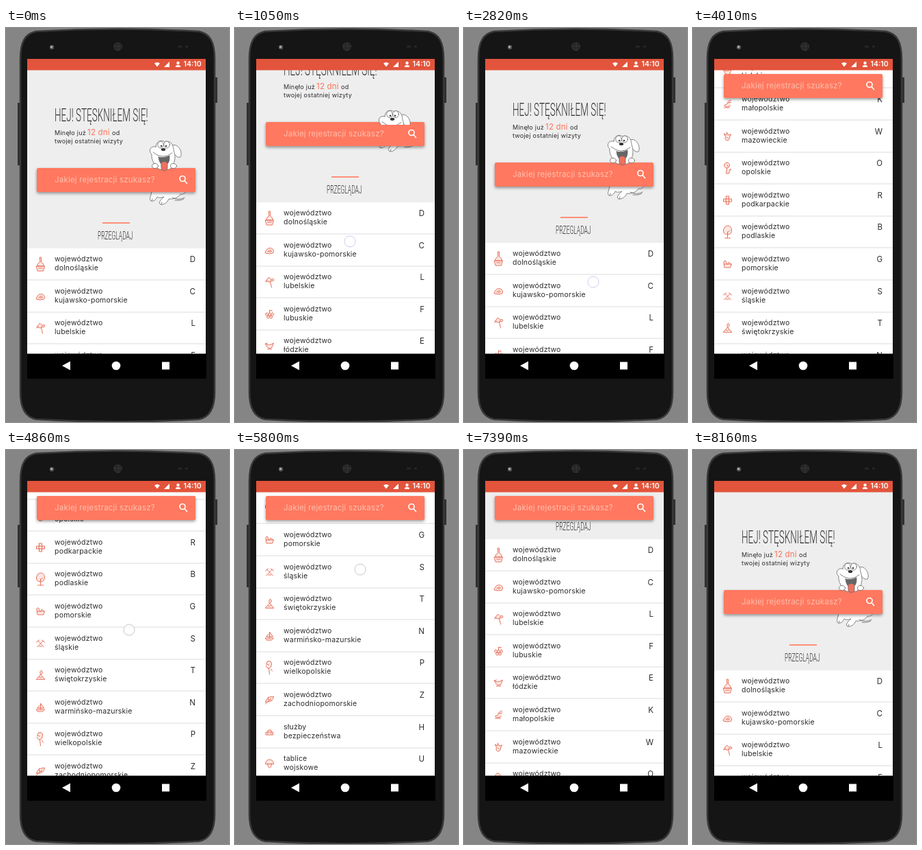
Write an HTML page that moves like this. It is 326 px wide and 574 px high and loops after 8380 ms.

```html
<!DOCTYPE html>
<html lang="pl">
<head>
<meta charset="utf-8">
<style>
  html, body { margin: 0; width: 100%; height: 100%; overflow: hidden; background: #858585; }
  svg { display: block; width: 326px; height: 574px; }
  text { font: 400 10.5px Inter, sans-serif; letter-spacing: .2px; fill: #2c2c2c; }
  .small { font-size: 9px; letter-spacing: .25px; }
  .days { font-size: 11.5px; fill: #ff7258; }
  .code { font-size: 11.5px; text-anchor: end; letter-spacing: 0; }
  .hint { font-size: 11.4px; letter-spacing: .25px; fill: #ffbfae; }
  .clock { font-weight: 600; fill: #fff; letter-spacing: 0; }
  .thin { font: 300 25.5px Roboto, sans-serif; letter-spacing: 0; fill: #333; }
  .icon { fill: #e8705b2b; stroke: #e8705b; stroke-width: 1; stroke-linejoin: round; stroke-linecap: round; }
  .dog { fill: #fff; stroke: #666; stroke-width: .8; stroke-linecap: round; }
  .slab { filter: drop-shadow(0 2px 2px #0006); }
</style>
</head>
<body>
<svg viewBox="0 0 326 574">
  <defs>
    <clipPath id="view"><path d="M31 61H292V475H31z"/></clipPath>
    <clipPath id="above"><path d="M200-60H270V4H200z"/></clipPath>
    <clipPath id="below"><path d="M200 34H270V70H200z"/></clipPath>
    <pattern id="mesh" width="2.4" height="2.4" patternUnits="userSpaceOnUse"><circle cx="1" cy="1" r=".8" fill="#555"/></pattern>
  </defs>

  <path d="M17 109h4v91h-4zM305 72h4v37h-4z" fill="#303030"/>
  <path d="M21 45C21 20 28 8 44 5Q163-2 282 5C298 8 305 20 305 45V531C305 554 298 567 282 570Q163 577 44 570C28 567 21 554 21 531z" fill="#151515" stroke="#383838" stroke-width="2.500"/>
  <circle cx="67" cy="28" r="3.2" fill="#555"/><circle cx="66.5" cy="27.5" r="1.5" fill="#bbb"/>
  <circle cx="163.5" cy="27" r="6.5" fill="url(#mesh)"/>
  <path d="M251 27h6M262 27h4" stroke="#262626" stroke-width="3"/>

  <g clip-path="url(#view)">
    <path d="M31 61H292V475H31z" fill="#fff"/>
    <g id="page">
      <path d="M31-100H292V321H31z" fill="#eee"/>
      <text class="thin" transform="translate(71 136) scale(.53 1)">HEJ! STĘSKNIŁEM SIĘ!</text>
      <text class="small" x="71" y="156">Minęło już</text>
      <text class="days" x="119" y="156">12 dni</text>
      <text class="small" x="155" y="156">od</text>
      <text class="small" x="71" y="167.5">twojej ostatniej wizyty</text>
      <path d="M141 283h40v2h-40z" fill="#ff9079"/>
      <text class="thin" style="font-size:16px" transform="translate(134 308) scale(.53 1)">PRZEGLĄDAJ</text>
      <g id="rows"></g>
    </g>
    <g id="bar">
      <g clip-path="url(#below)"><g id="legs" class="dog">
        <path d="M213 30C214 38 209 43 211 47C214 50 219 47 221 42C224 44 228 43 231 42C226 46 222 51 226 53C231 54 236 50 238 45C246 46 253 42 255 38C259 39 264 36 263 31z"/>
        <path d="M214 45l-1 3M228 50l-1 3M243 43q10 5 18 0M247 47q8 1 13-2" fill="none"/>
      </g></g>
      <rect class="slab" x="45" width="232" height="35" rx="2" fill="#ff785f"/>
      <text class="hint" x="71" y="20.5">Jakiej rejestracji szukasz?</text>
      <g fill="none" stroke="#fff" stroke-width="1.7" stroke-linecap="round"><circle cx="258" cy="15.5" r="4"/><path d="M261 18.500l3.500 4"/></g>
      <g clip-path="url(#above)"><g id="head" class="dog">
        <path d="M243-33C252-37 259-22 255-16C250-14 245-21 243-26z"/>
        <path d="M219-31C210-33 208-24 213-20C212-11 218-4 224 2H239C247-5 249-16 245-26C245-36 238-41 232-38C226-42 219-38 219-31z"/>
        <ellipse cx="226" cy="-34" rx="4.300" ry="5"/><ellipse cx="235" cy="-34" rx="4.300" ry="5"/>
        <g fill="#333" stroke="none"><circle cx="227" cy="-32" r="1.200"/><circle cx="234" cy="-32" r="1.200"/><ellipse cx="230" cy="-27" rx="3.200" ry="2"/></g>
        <path d="M215-23Q229-11 243-22" fill="none"/>
        <path d="M223-16Q231-14 239-18Q240-5 231-4Q224-5 223-16z" fill="#666"/>
        <path d="M227-8Q231-11 236-8V0C235 5 228 5 227 0z" fill="#f0705e"/>
        <ellipse cx="218" cy="-3" rx="4.500" ry="3.500"/><ellipse cx="245" cy="-3" rx="4.500" ry="3.500"/>
      </g></g>
    </g>
    <circle id="touch" r="8" fill="#fff8"/>
  </g>

  <path d="M31 45H292V61.500H31z" fill="#e2543b"/>
  <path d="M217 51.500q4-3 8 0l-4 5zM239 49v8h-8z" fill="#fff"/>
  <path d="M248 57v-2q3.500-2 7 0v2z" fill="#fff"/><circle cx="251.500" cy="51" r="2.200" fill="#fff"/>
  <text class="clock" x="259.500" y="56">14:10</text>
  <path d="M31 474.500H293V511H31z"/>
  <path d="M94 485.500v13l-12-6.500zM228 486.500h11v11h-11z" fill="#fff"/><circle cx="161" cy="492" r="6.300" fill="#fff"/>
</svg>

<script>
const $ = id => document.getElementById(id);
const LOOP = 8380, ROW = 46.6, LIST_TOP = 321, BAR_TOP = 204, BAR_PIN = 67, END = 685;

// name|plate letter|icon drawn around its centre
const regions = `dolnośląskie|D|M-1-10h2v7q4 2 4 6h-10q0-4 4-6zM-6 3H6L4 10H-4zM-3 6H3
kujawsko-pomorskie|C|M-6 2Q-3-5 3-3Q8 0 5 4Q0 6-6 4zM-3 2Q1-2 3 1Q1 3-1 2
lubelskie|L|M-5-2l4-5 4 4-3 3zM1-1l2 9M3-4q4-2 3 2l-4 1M-6 0l3-2
lubuskie|F|M-4-2a2 2 0 1 0 .1 0M0-2a2 2 0 1 0 .1 0M4-2a2 2 0 1 0 .1 0M-2 2a2 2 0 1 0 .1 0M2 2a2 2 0 1 0 .1 0M0-2v-4l4 1
łódzkie|E|M-6-3Q-2 1 6-4L3 3Q-2 5-4 1zM-3 5H3M-6-3l3-1
małopolskie|K|M5-6Q0-5-1 0L-5 2Q-1 6 4 2M1-2l4-1M-5 5H3
mazowieckie|W|M-5-4l3 2 1-4 2 4 4-1-2 4Q3 6-1 6Q-5 4-3 1zM-1 1l2 2
opolskie|O|M-1-8a4 4 0 1 0 .1 0M-1-5l2 3M-1 0l-1 8h4l2-7 1 2
podkarpackie|R|M-2-6h4v4h4v4h-4v4h-4v-4h-4v-4h4zM-2-2h4v4h-4z
podlaskie|B|M0 9V0M0 4Q-7 4-6-3Q-4-9 0-9Q5-9 6-3Q6 4 0 4M0 1l3-3M-4 9H4
pomorskie|G|M-5 0H6L4 5H-4zM-5 0Q-7-5-3-5l2 5M0 0l2-3 3 3
śląskie|S|M-5 5L4-4M5 5L-4-4M-6-2l4-3M2-5l4 3M-2 4h4
świętokrzyskie|T|M-6 6L0-1L6 6zM0-1q-2-4 1-6l2 3-2 3M-2 3l2 1 2-2
warmińsko-mazurskie|N|M-6 3H6L3 6H-4zM0 3V-6L5 1H0M-1-3L-5 1h4
wielkopolskie|P|M-3-9q6-2 6 4Q3 0-1 1l1 9M-3-9l-2 4 4 1M-1 1q-4 0-4-4M2 2l2 3
zachodniopomorskie|Z|M-6 3Q-4-5 6-5Q5 3-3 3zM-6 6L2-2M-2-4v4h4
bezpieczeństwa|H|M-5 0H5V4H-5zM-3 0l1-3h4l1 3M-3 2h1M2 2h1
wojskowe|U|M-6 0Q-5-6 0-6Q5-6 6 0zM-3 0Q-2 6 0 6Q3 5 3 0`.split("\n");
const titles = { H: "służby", U: "tablice" };

$("rows").innerHTML = regions.map((line, i) => {
  const [name, code, icon] = line.split("|");
  return `<g transform="translate(0 ${LIST_TOP + Math.round(i * ROW)})">
    <path class="icon" transform="translate(50.5 23)" d="${icon}"/>
    <text x="71" y="19">${titles[code] || "województwo"}</text>
    <text x="71" y="31.500">${name}</text>
    <text class="code" x="277" y="20">${code}</text>
    <path d="M31 46H292" stroke="#dcdcdc"/></g>`;
}).join("");

const smooth = p => p * p * (3 - 2 * p);
const drag = p => (p + smooth(p)) / 2;
const inOut = p => p < .5 ? 4 * p ** 3 : 1 - 4 * (1 - p) ** 3;
const out = power => p => 1 - (1 - p) ** power;

// start, end, target scroll, easing
const moves = [
  [430, 1700, 139, smooth],
  [1880, 2920, 0, drag],
  [3330, 4530, 507, out(3)],
  [4760, 5130, END, out(1.5)],
  [5620, 6590, 437, inOut],
  [6820, 7420, 190, out(2)],
  [7680, 8160, 0, out(1.5)],
];
// start, end, x, y, colour
const touches = [
  [280, 2920, 168, 378, "#d2cdee"],
  [3330, 3500, 180, 380, "#c8c8c8"],
  [4760, 4870, 180, 330, "#c8c8c8"],
  [5620, 6110, 183, 168, "#c8c8c8"],
  [6820, 6940, 183, 200, "#c8c8c8"],
  [7680, 7790, 183, 220, "#c8c8c8"],
];

const clamp = v => Math.min(1, Math.max(0, v));
const shift = (id, y) => $(id).setAttribute("transform", `translate(0 ${y})`);

function scrollAt(t) {
  let pos = 0;
  for (const [start, end, target, ease] of moves)
    if (t > start) pos += (target - pos) * ease(clamp((t - start) / (end - start)));
  return Math.round(pos);
}

function draw(now) {
  const t = now % LOOP, scroll = scrollAt(t);
  const hidden = clamp((scroll - 15) / 110);
  shift("page", -scroll);
  shift("bar", Math.max(BAR_PIN, BAR_TOP - scroll));
  shift("head", 48 * hidden);
  shift("legs", -22 * hidden);

  const touch = touches.find(([start, end]) => t >= start && t < end);
  $("touch").style.display = touch ? "" : "none";
  if (touch) {
    const [start, , x, y, colour] = touch;
    const drift = start < 1880 ? 21 * smooth(clamp((t - 1880) / 940)) : 0;
    $("touch").setAttribute("cx", x + drift);
    $("touch").setAttribute("cy", y - scroll + scrollAt(start));
    $("touch").setAttribute("stroke", colour);
  }
  requestAnimationFrame(draw);
}
requestAnimationFrame(draw);
</script>
</body>
</html>
```
